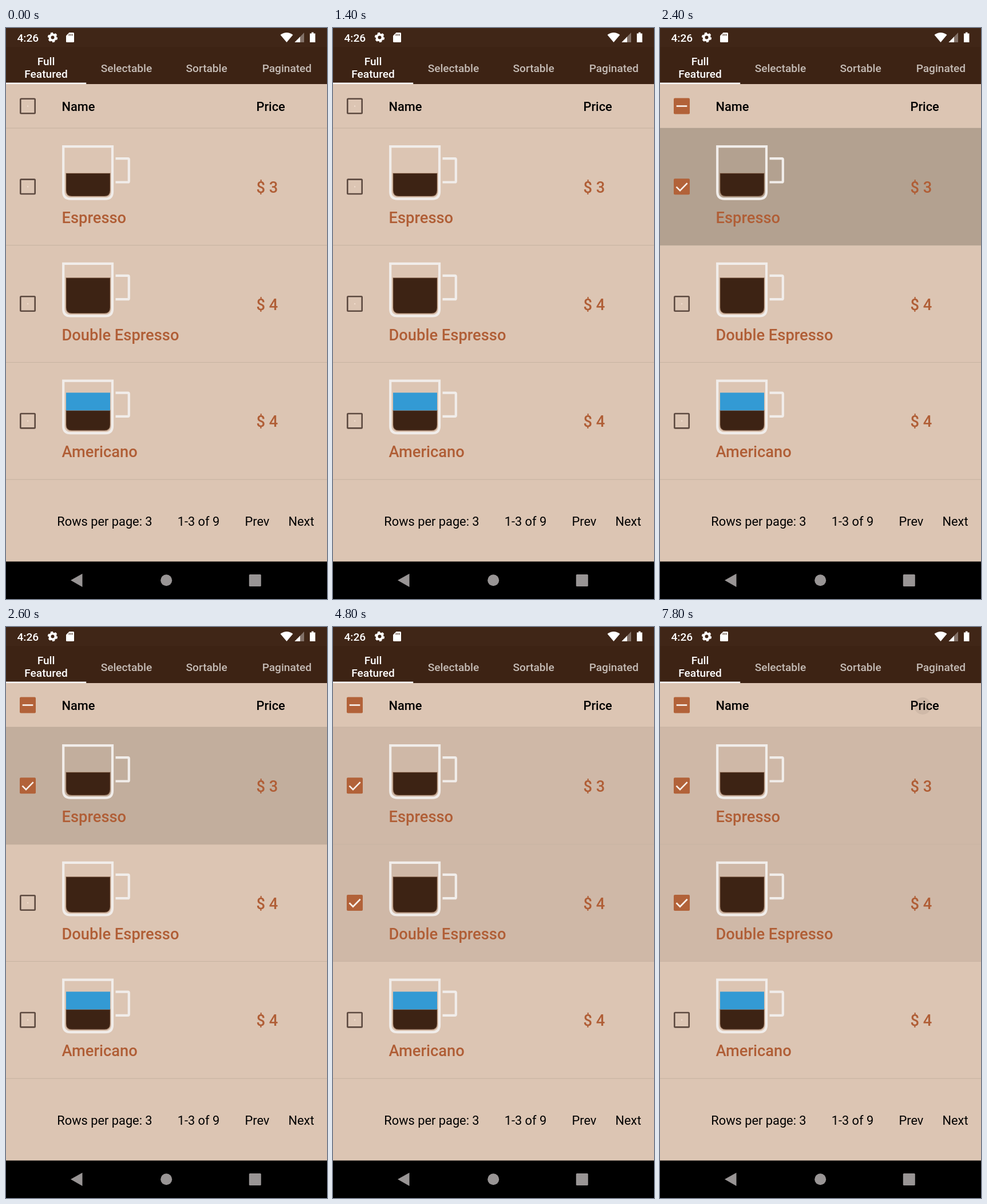
Write an HTML page that moves like this. It is 561x998 px and loops after 8000 ms.

```html
<!DOCTYPE html>
<html lang="en">
<head>
<meta charset="utf-8">
<title>Coffee table</title>
<style>
  html, body { margin: 0; width: 100%; height: 100%; overflow: hidden; background: #dcc5b3; }
  svg { display: block; width: 100vw; height: 100vh; }
  text { font: 400 21.8px Roboto, sans-serif; }
  .tab { font-size: 19.1px; font-weight: 500; fill: #c5bcb6; text-anchor: middle; }
  .on { fill: #fff; }
  .head { font-weight: 500; }
  .item { font-size: 27.3px; font-weight: 500; fill: #b05e36; }
</style>
</head>
<body>
<svg id="stage" viewBox="0 0 561 998"></svg>
<script>
const LOOP = 8000, STEP = 200;
const ROW_TOP = 175, ROW_H = 204.7;
const COFFEE = '#3d2314', WATER = '#339ad4';

const items = [
  { name: 'Espresso', price: 3, top: 254 },
  { name: 'Double Espresso', price: 4, top: 232 },
  { name: 'Americano', price: 4, top: 259, water: 228 }
];

const text = (x, y, str, cls = '') => `<text x="${x}" y="${y}" class="${cls}">${str}</text>`;
const rect = (x, y, w, h, fill, extra = '') =>
  `<rect x="${x}" y="${y}" width="${w}" height="${h}" fill="${fill}" ${extra}/>`;

// A box with both its states, toggled by id
const checkbox = (id, cy, mark) => `
  <g transform="translate(38 ${cy})">
    <g id="${id}-off">
      ${rect(-12.7, -12.7, 25.4, 25.4, 'none', 'rx="1.2" stroke="#5d4a40" stroke-width="2.6"')}
      ${rect(-1, -1, 2.2, 2.2, '#f0dccd')}
    </g>
    <g id="${id}-on">
      ${rect(-14, -14, 28, 28, '#b26239', 'rx="2"')}
      <path d="${mark}" fill="none" stroke="#f8efe9" stroke-width="2.7"/>
    </g>
  </g>`;

const cup = ({ top, water }) => `
  <path d="M105 ${top}H182V284q0 10-10 10H115q-10 0-10-10Z" fill="${COFFEE}"
    stroke="#8a6248" stroke-opacity=".45" stroke-width="1.6"/>
  ${water ? rect(105, water, 77, top - water, WATER) : ''}
  <path d="M100.2 207.2H186V286q0 12.7-12.7 12.7H113q-12.8 0-12.8-12.7Z
    M191.5 228.2H213q1.8 0 1.8 1.8V267.7q0 1.8-1.8 1.8H191.5"
    fill="none" stroke="#f1edea" stroke-width="4.2"/>`;

const row = (item, i) => `
  <g transform="translate(0 ${i * ROW_H})">
    ${checkbox('box' + i, 277.3, 'M-9.5 .3L-3 6.8L9.7-6.2')}
    ${cup(item)}
    ${text(97.5, 341, item.name, 'item')}
    ${text(437.5, 288, '$ ' + item.price, 'item')}
  </g>`;

const statusBar = `
  ${rect(0, 0, 561, 34, '#402617')}
  <text x="19.5" y="23.5" class="tab on" style="text-anchor:start">4:26</text>
  <g fill="none" stroke="#fff">
    <circle cx="81.5" cy="16.5" r="5" stroke-width="4"/>
    <circle cx="81.5" cy="16.5" r="7.4" stroke-width="2.6" stroke-dasharray="4.2 3.55"/>
  </g>
  <g fill="#fff">
    <path d="M110.5 8H117.5q1.5 0 1.5 1.5V23.5q0 1.5-1.5 1.5H106.5q-1.5 0-1.5-1.5V13.5Z"/>
    <path d="M479.5 12Q490.5 4 501.5 12L490.5 25Z"/>
    <path d="M504.5 25H521V8Z" opacity=".35"/>
    <path d="M504.5 25H514V15.2Z"/>
    <path d="M534 7.5H537.5V9.5H540.5V25H531V9.5H534Z"/>
  </g>
  <path d="M110.3 10.5v3M113 10.5v3M115.7 10.5v3" stroke="#402617" stroke-width="1.2"/>`;

const tabs = `
  ${rect(0, 33, 561, 65, COFFEE)}
  ${rect(0, 95.5, 140.2, 2.5, '#fff')}
  ${text(70, 65, 'Full', 'tab on')}${text(70, 87, 'Featured', 'tab on')}
  ${['Selectable', 'Sortable', 'Paginated'].map((s, i) => text(210.4 + i * 140.25, 76.5, s, 'tab')).join('')}`;

const footer = text(89.3, 870, 'Rows per page: 3') + text(299.7, 870, '1-3 of 9') +
  text(417.5, 870, 'Prev') + text(493.5, 870, 'Next');

const navBar = `
  ${rect(0, 932.5, 561, 66, '#000')}
  <g fill="#999595">
    <path d="M113 965.3L133.5 953.7V977Z"/>
    <circle cx="280.2" cy="965.3" r="10"/>
    ${rect(424.8, 955, 21, 21, '#999595', 'rx="1.5"')}
  </g>`;

const rowBand = i => rect(0, ROW_TOP + i * ROW_H, 561, ROW_H, '#cfb8a7', `id="band${i}"`);
const dividers = [0, 1, 2, 3].map(i => rect(0, ROW_TOP - .5 + i * ROW_H, 561, 1.1, '#c8b4a2')).join('');

document.getElementById('stage').innerHTML = `
  <clipPath id="firstRow">${rect(0, ROW_TOP, 561, ROW_H, '#000')}</clipPath>
  ${rect(0, 0, 561, 998, '#dcc5b3')}
  ${rowBand(0)}${rowBand(1)}${dividers}
  <g clip-path="url(#firstRow)"><circle id="rowRipple" fill="#051205"/></g>
  <circle id="boxRipple" cx="38" cy="482"/>
  <circle id="priceRipple" cx="459" cy="138"/>
  ${checkbox('all', 136.5, 'M-9.3 0H9.3')}
  ${text(97.5, 145, 'Name', 'head')}${text(437.5, 145, 'Price', 'head')}
  ${items.map(row).join('')}
  ${footer}${statusBar}${tabs}${navBar}`;

const el = id => document.getElementById(id);
const clamp = v => Math.min(1, Math.max(0, v));
const span = (t, from, to) => clamp((t - from) / (to - from));
const mix = (a, b, p) => a + (b - a) * p;
const show = (id, on) => el(id).setAttribute('visibility', on ? 'visible' : 'hidden');
const set = (id, attrs) => {
  for (const key in attrs) el(id).setAttribute(key, attrs[key]);
};

function check(id, on) {
  show(id + '-on', on);
  show(id + '-off', !on);
}

function render(t) {
  const first = t >= 2300, second = t >= 4300;
  check('all', first);
  check('box0', first);
  check('box1', second);
  check('box2', false);
  show('band0', first);
  show('band1', second);

  // The ripple drifts from the touch point to the middle of the row
  const p = span(t, 1900, 2160);
  set('rowRipple', {
    cx: mix(38, 280.5, p), cy: mix(259, 277.3, p), r: mix(168, 300, p),
    opacity: t < 1900 ? 0 : mix(.115, .137, p) * (1 - span(t, 2400, 2775))
  });
  set('boxRipple', {
    r: mix(8, 28, span(t, 3940, 4180)),
    opacity: t < 3940 ? 0 : .08 * (1 - span(t, 4200, 4575))
  });
  set('priceRipple', { r: mix(8, 24, span(t, 7700, 7930)), opacity: t < 7700 ? 0 : .06 });
}

const start = performance.now();
function tick() {
  const t = (performance.now() - start) % LOOP;
  render(Math.floor(t / STEP) * STEP);
  requestAnimationFrame(tick);
}
tick();
</script>
</body>
</html>
```
